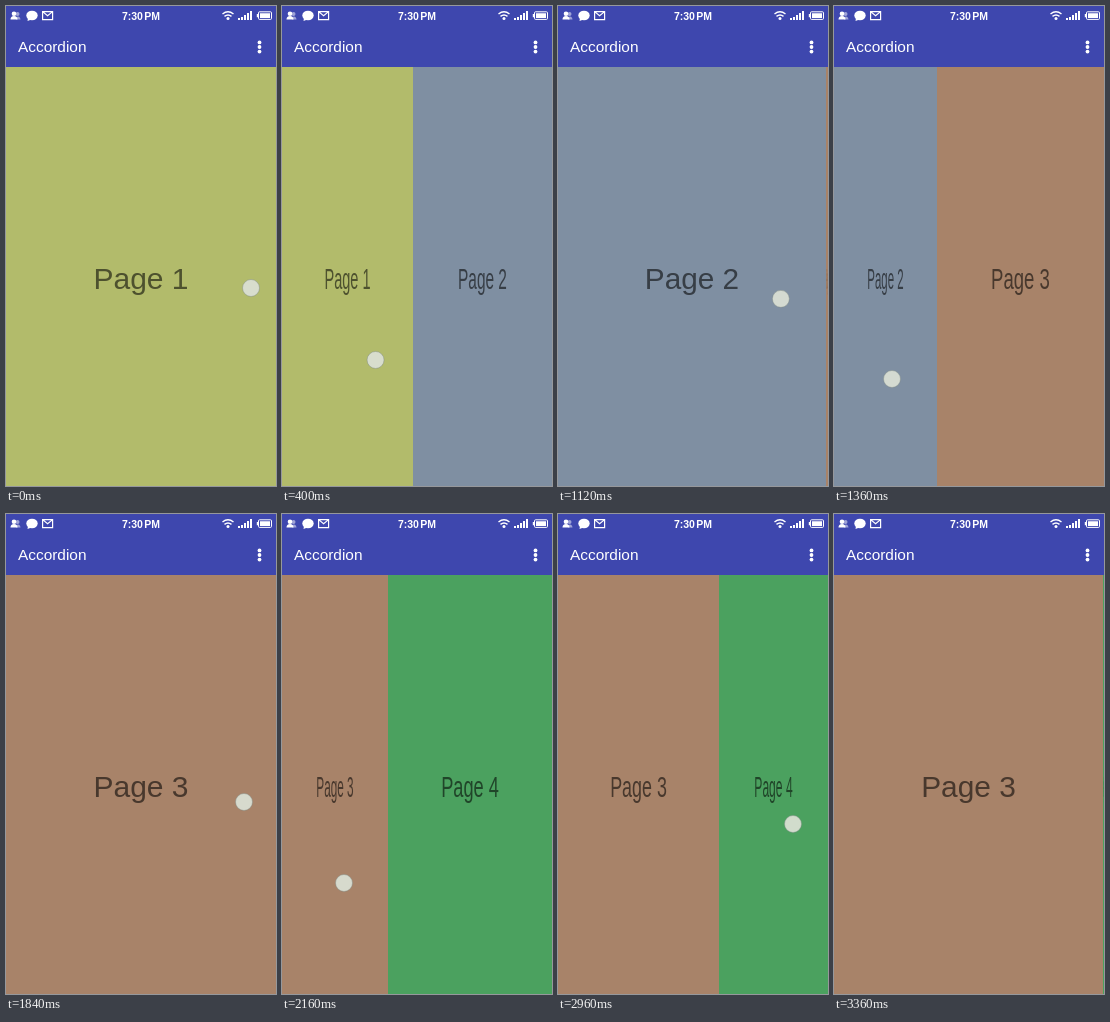
Animation, 270 px wide and 480 px high, one loop 3.44 s. Source, as an HTML page:

```html
<!DOCTYPE html>
<html lang="en">
<head>
<meta charset="utf-8">
<title>Accordion</title>
<style>
  html, body { margin: 0; width: 100%; height: 100%; overflow: hidden; background: #3e47ae; }
  svg { display: block; width: 270px; height: 480px; font-family: "Liberation Sans", Arial, sans-serif; }
  .page text { font-size: 30px; text-anchor: middle; fill: #000; fill-opacity: .57; }
</style>
</head>
<body>
<svg viewBox="0 0 270 480">
  <g id="pages"></g>
  <rect width="270" height="61" fill="#3e47ae"/>
  <g fill="#fff">
    <!-- status bar -->
    <g opacity=".5"><circle cx="11.5" cy="8" r="2"/><path d="M10 13.5q0-3 2-3t2.500 3z"/></g>
    <circle cx="8" cy="7.800" r="2.300"/>
    <path d="M4.500 13.500q0-3.500 3.500-3.500t3.500 3.500z"/>
    <ellipse cx="26" cy="9.500" rx="5.700" ry="4.800"/>
    <path d="M22 12l-.5 3 4-1.500z"/>
    <path d="M36.600 5.600h10v8h-10zl5 4.200 5-4.200" fill="none" stroke="#fff" stroke-width="1.200"/>
    <text x="135" y="13.800" font-size="10.500" font-weight="bold" text-anchor="middle" word-spacing="-1.500">7:30 PM</text>
    <g fill="none" stroke="#fff" stroke-width="1.400">
      <path d="M216.500 8q5.500-4.600 11 0M218.500 10.400q3.500-2.800 7 0"/>
    </g>
    <circle cx="222" cy="12.500" r="1.500"/>
    <path d="M232 12h2v2h-2zM235 11h2v3h-2zM238 9h2v5h-2zM241 7h2v7h-2zM244 5h2v9h-2z"/>
    <rect x="252.500" y="5.800" width="13" height="7.600" rx="1" fill="none" stroke="#fff"/>
    <path d="M254 7.300h10v4.600h-10zM250.800 8h1.500v3.200h-1.500z"/>
    <!-- app bar -->
    <text x="12" y="46.300" font-size="15.400">Accordion</text>
    <circle cx="253.500" cy="36.400" r="1.900"/>
    <circle cx="253.500" cy="41" r="1.900"/>
    <circle cx="253.500" cy="45.600" r="1.900"/>
  </g>
  <circle id="touch" r="8.500" fill="#dadfd3" fill-opacity=".94" stroke="#7f8a86" stroke-opacity=".45"/>
</svg>
<script>
const W = 270, LOOP = 3440, STEP = 80, SLOP = 12, SETTLE = 640;
const colors = ['#b2bb6b', '#7f8fa2', '#a88369', '#4ba15f'];

// Each swipe: finger down, move start, release; start and end point; page and direction.
const swipes = [
  { down: 0, start: 70, end: 560, from: [245, 282], to: [43, 378], page: 0, dir: 1 },
  { down: 1040, start: 1070, end: 1360, from: [237, 286], to: [58, 373], page: 1, dir: 1 },
  { down: 1840, start: 1845, end: 2160, from: [238, 288], to: [62, 369], page: 2, dir: 1 },
  { down: 2640, start: 2692, end: 2960, from: [62, 376], to: [235, 310], page: 3, dir: -1 }
];

const clamp = (v, lo, hi) => Math.min(hi, Math.max(lo, v));
const smooth = u => u * u * (3 - 2 * u);
const mix = (a, b, u) => a + (b - a) * u;

const touch = document.getElementById('touch');
const root = document.getElementById('pages');
root.innerHTML = colors.map((c, i) =>
  `<g class="page"><rect y="61" width="${W}" height="419" fill="${c}"/>` +
  `<text x="135" y="282.700">Page ${i + 1}</text></g>`).join('');
const pages = [...root.children];

function draw(t) {
  const s = swipes.filter(g => g.down <= t).pop();
  const u = smooth(clamp((t - s.start) / (s.end - s.start), 0, 1));
  const x = mix(s.from[0], s.to[0], u), y = mix(s.from[1], s.to[1], u);

  const dragged = Math.max(0, Math.abs(x - s.from[0]) - SLOP) / W;
  const left = 1 - clamp((t - s.end) / SETTLE, 0, 1);
  const done = 1 - (1 - dragged) * left ** 5;
  const scroll = Math.round((s.page + s.dir * done) * W);

  pages.forEach((page, i) => {
    const a = clamp(i * W - scroll, 0, W), b = clamp((i + 1) * W - scroll, 0, W);
    page.setAttribute('visibility', b > a ? 'visible' : 'hidden');
    page.setAttribute('transform', `translate(${a}) scale(${(b - a) / W} 1)`);
  });

  touch.setAttribute('visibility', t <= s.end ? 'visible' : 'hidden');
  touch.setAttribute('cx', x);
  touch.setAttribute('cy', y);
}

const t0 = performance.now();
function tick() {
  const t = (performance.now() - t0) % LOOP;
  draw(Math.floor(t / STEP) * STEP);
  requestAnimationFrame(tick);
}
tick();
</script>
</body>
</html>
```
